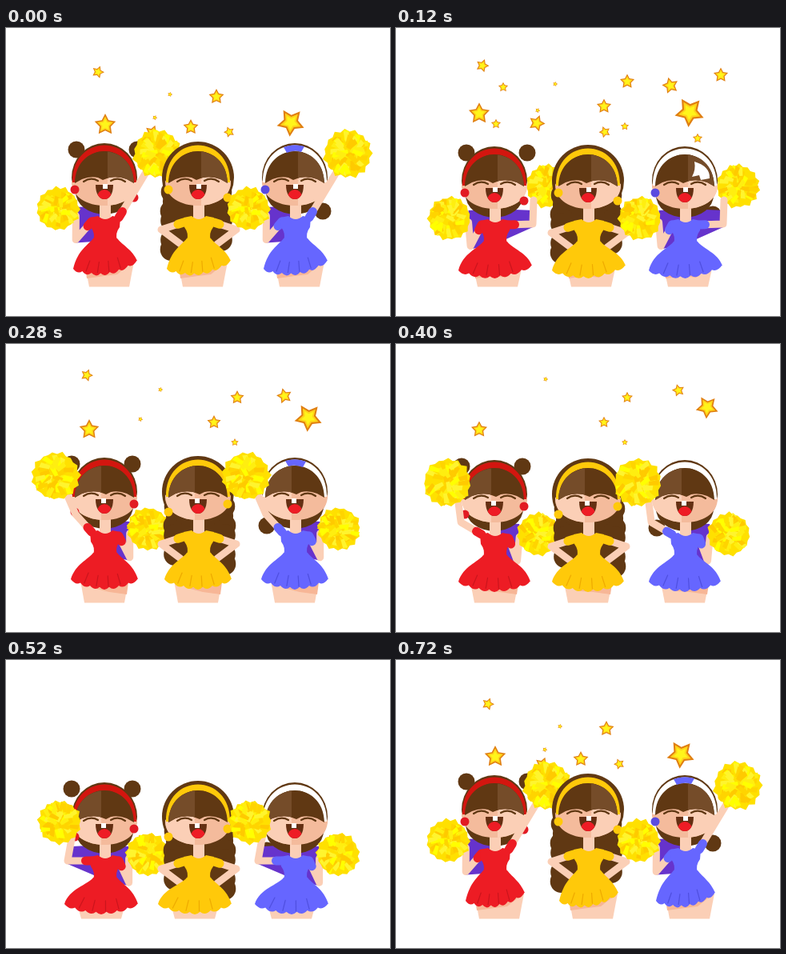
These frames come from a looping animation (480x360 px, 840 ms). An HTML page with a canvas:

```html
<!DOCTYPE html>
<html lang="en">
<head>
<meta charset="utf-8">
<title>Cheerleaders</title>
<style>
html, body { margin: 0; width: 100%; height: 100%; overflow: hidden; background: #fff; }
canvas { display: block; width: 480px; height: 360px; }
</style>
</head>
<body>
<canvas id="stage" width="480" height="360"></canvas>
<script>
const ctx = document.getElementById('stage').getContext('2d');
const HAIR = '#603813', SHINE = '#754c29', SKIN = '#fbcfb6', SHADE = '#f4bb9c', CAPE = '#6633cc';
const TAU = Math.PI * 2, MID = 124;

const girls = [
  { kind: 'buns', dx: 0, main: '#ed1c24', dark: '#cb151d', band: '#d3160f', ear: '#e21b23' },
  { kind: 'long', dx: 117, main: '#ffc90a', dark: '#eeaa00', band: '#ffc90a', ear: '#ffc90a' },
  { kind: 'tail', dx: 238, main: '#6666ff', dark: '#4f4fdf', band: '#ffffff', ear: '#5a4be0' }
];

// y: head height, side: which way she faces, poms: left and right hand.
const cheer = { beat: 0, y: 187, side: 1, lean: 5, flare: 37, poms: [[65, 226], [189, 157]] };
const poses = [
  { at: 0, ...cheer, flare: 40 },
  { at: 40, ...cheer },
  { at: 120, beat: 1, y: 191, side: 1, lean: 3, flare: 46, poms: [[67, 238], [189, 198]], glare: true },
  { at: 280, beat: 2, y: 185, side: -1, lean: -1, flare: 42, poms: [[62, 165], [178, 231]] },
  { at: 400, beat: 3, y: 188, side: -1, lean: -1, flare: 45, poms: [[64, 173], [178, 238]] },
  { at: 520, beat: 4, y: 196, side: -1, lean: -5, flare: 46, poms: [[67, 203], [177, 243]] },
  { at: 720, ...cheer }
];

// x, y, size, first beat, last beat, drift per beat
const stars = [
  [356, 118, 18, 0, 3, 11, -13], [115, 55, 8, 0, 2, -7, -8], [205, 83, 3, 0, 3, -6, -13],
  [186, 112, 3, 0, 2, -9, -9], [183, 131, 10, 0, 1, -7, -12], [279, 130, 7, 0, 1, -18, 0],
  [124, 121, 14, 0, 0], [263, 86, 10, 0, 0], [231, 124, 10, 0, 0],
  [343, 72, 10, 1, 3, 5, -7], [104, 107, 13, 1, 3], [289, 67, 9, 1, 3], [260, 98, 9, 1, 3],
  [286, 123, 5, 1, 3], [406, 59, 9, 1, 1], [134, 74, 6, 1, 1], [125, 120, 6, 1, 1], [377, 138, 6, 1, 1]
];

function random(seed) {
  let s = seed * 7919 + 17;
  return () => (s = (s * 16807) % 2147483647) / 2147483647;
}

function oval(x, y, rx, ry, color) {
  ctx.fillStyle = color;
  ctx.beginPath();
  ctx.ellipse(x, y, rx, ry, 0, 0, TAU);
  ctx.fill();
}
const dot = (x, y, r, color) => oval(x, y, r, r, color);

function box(x, y, w, h, color) {
  ctx.fillStyle = color;
  ctx.fillRect(x, y, w, h);
}

function poly(points, color) {
  ctx.fillStyle = color;
  ctx.beginPath();
  points.forEach(([x, y]) => ctx.lineTo(x, y));
  ctx.closePath();
  ctx.fill();
}

function shape(d, color) {
  ctx.fillStyle = color;
  ctx.fill(new Path2D(d));
}

function clipped(d, color, paint) {
  shape(d, color);
  ctx.save();
  ctx.clip(new Path2D(d));
  paint();
  ctx.restore();
}

function line(points, width, color) {
  ctx.strokeStyle = color;
  ctx.lineWidth = width;
  ctx.lineCap = ctx.lineJoin = 'round';
  ctx.beginPath();
  points.forEach(([x, y]) => ctx.lineTo(x, y));
  ctx.stroke();
}

function ring(x, y, n, turn, radius) {
  return Array.from({ length: n }, (_, i) => {
    const a = turn + i * TAU / n - TAU / 4, d = radius(i);
    return [x + d * Math.cos(a), y + d * Math.sin(a)];
  });
}

function drawStar([x, y, size, first, last, vx = 0, vy = 0], beat) {
  if (beat < first || beat > last) return;
  const age = beat - first;
  const r = Math.max(3, size * Math.cos((beat - 1) / 3 * TAU / 6));
  const layer = (k, color) => poly(
    ring(x + vx * age, y + vy * age, 10, vx * -0.05, i => r * k * (i % 2 ? 0.52 : 1)), color);
  layer(1.06, '#e07f12');
  layer(0.8, '#ffd41a');
  layer(0.55, '#fff51a');
}

function pom([x, y], r, seed) {
  const rnd = random(seed);
  poly(ring(x, y, 30, rnd() * TAU, i => r * (i % 2 ? 0.92 : 0.95 + rnd() * 0.12)), '#ffe000');
  const tones = ['#ffff00', '#ffca00', '#ffee10', '#ffd400', '#fff42e'];
  for (let i = 0; i < 46; i++) {
    const a = rnd() * TAU, d = r * 0.78 * Math.sqrt(rnd());
    const l = r * 0.22, w = r * 0.11;
    ctx.save();
    ctx.translate(x + d * Math.cos(a), y + d * Math.sin(a));
    ctx.rotate(a + (rnd() - 0.5) * 1.2);
    poly([[-l, -w * 0.6], [l, -w], [l * 0.8, w], [-l, w * 0.8]], tones[i % 5]);
    ctx.restore();
  }
}

// Two equal bones from shoulder to the pom's rim, elbow pointing out and down.
function reach(p, hand) {
  const [px, py] = p.poms[hand], out = hand ? 1 : -1;
  const raised = py < p.y;
  const sx = MID + out * 17, sy = p.y + (raised ? 50 : 55);
  const dist = Math.hypot(px - sx, py - sy);
  const ux = (px - sx) / dist, uy = (py - sy) / dist, d = dist - 24;
  const bend = Math.sqrt(Math.max(0, 30 * 30 - d * d / 4));
  return {
    raised, pom: [px, py], size: raised ? 30 : 27,
    joints: [
      [sx, sy],
      [sx + ux * d / 2 - out * uy * bend, sy + uy * d / 2 + out * ux * bend],
      [sx + ux * d, sy + uy * d]
    ]
  };
}

function drawArm(joints, main) {
  line(joints, 9, SKIN);
  const [[sx, sy], [ex, ey]] = joints;
  line([[sx, sy], [sx + (ex - sx) * 0.25, sy + (ey - sy) * 0.25]], 11, main);
}

function drawCape(arm, bust) {
  if (arm.raised) return;
  const [, elbow, hand] = arm.joints;
  poly([[MID, bust - 14], [hand[0], bust - 12], [elbow[0], elbow[1] + 4], [MID, bust + 30]], CAPE);
}

// Head parts are drawn facing left and mirrored by inHead.
function inHead(p, paint) {
  ctx.save();
  ctx.translate(MID - 1, p.y);
  ctx.scale(-p.side, 1);
  paint();
  ctx.restore();
}

function hairTie(g) {
  if (g.kind === 'buns') [-41, 35].forEach(x => dot(x, -35, 10.5, HAIR));
  if (g.kind === 'tail') dot(-35, 42, 10.5, HAIR);
}

function backHair(g) {
  if (g.kind === 'long') {
    for (let y = 18; y <= 90; y += 12) {
      const swell = 2 * Math.sin(y / 6);
      if (y < 80) dot(-28 - swell, y, 14, HAIR);
      dot(32 + swell, y, 14, HAIR);
    }
    box(-30, 20, 60, 64, HAIR);
    oval(0, 0, 45, 45, HAIR);
  } else {
    oval(0, 0, 41, 43, HAIR);
    oval(0, 18, 36, 28, HAIR);
  }
}

function face(g, p) {
  clipped('M-41 5C-41 25-21 35 0 35C21 35 41 25 41 5C38-6-38-6-41 5Z', SHADE,
    () => box(-45, -10, 41, 60, SKIN));

  shape('M-40 6C-41-56 41-56 40 6L36 6C34-46-34-46-36 6Z', g.band);
  clipped('M-37 7C-36-46 36-46 37 7L28 2Q18-2 8 0L2 3L-6 0Q-18-2-28 2Z', HAIR,
    () => box(-40, -40, 36, 50, SHINE));
  if (g.kind === 'tail') {
    if (p.y < 188) shape('M-12-39Q2-43 14-38L10-31Q0-35-8-32Z', '#6666ff');
    if (p.glare) shape('M-12-24Q-32-18-31-3L-20-1L-18-7L-9-5Q-14-14-12-24Z', '#fff');
  }

  ctx.strokeStyle = HAIR;
  ctx.lineWidth = 2.2;
  ctx.lineCap = 'round';
  ctx.stroke(new Path2D('M-26 5Q-17-1-8 4M8 4Q17-1 26 5'));

  clipped('M-11 9L11 9C11 21 6 27 0 27C-6 27-11 21-11 9Z', '#642f12',
    () => oval(0, 24, 9, 9, '#ee1c25'));
  box(-4, 8, 6, 6, '#fff');

  if (g.kind !== 'tail') dot(-37, 25, 5.5, g.ear);
  if (g.kind !== 'tail' || p.side > 0) dot(37, 15, 5.5, g.ear);
}

function legs(p, top) {
  ctx.save();
  ctx.translate(MID + p.lean, 0);
  ctx.scale(-p.side, 1);
  poly([[-31, top], [31, top], [25, 323.5], [-25, 323.5]], SKIN);
  poly([[-30, top], [31, top], [28, 313], [6, 310], [-10, top + 16]], '#f7b696');
  ctx.restore();
}

function dress(g, p, y) {
  const waist = y + 27, hem = y + 71, x = MID + Math.min(p.lean, 0), tilt = Math.max(p.lean, 0);
  shape(`M105 ${y + 1}L115 ${y - 1}Q124 ${y + 7} 133 ${y - 1}L143 ${y + 1}L142 ${y + 13}` +
        `Q136 ${y + 21} 139 ${waist + 2}L109 ${waist + 2}Q112 ${y + 21} 106 ${y + 13}Z`, g.main);

  const at = u => [x + p.flare * u, hem - 11 * u * u - tilt * u];
  const [lx, ly] = at(-1), [rx, ry] = at(1), folds = 7;
  let d = `M109 ${waist}C102 ${waist + 9} ${lx + 6} ${waist + 14} ${lx} ${ly}`;
  for (let i = 0; i < folds; i++) {
    const [cx, cy] = at((i + 0.5) / folds * 2 - 1), [ex, ey] = at((i + 1) / folds * 2 - 1);
    d += `Q${cx} ${cy + 5} ${ex} ${ey - 1}`;
  }
  shape(d + `L${rx} ${ry}C${rx - 6} ${waist + 14} 146 ${waist + 9} 139 ${waist}Z`, g.main);
  for (let u = -0.6; u < 0.6; u += 0.36) {
    const [fx, fy] = at(u);
    line([[fx, fy - 2], [fx + (MID - fx) * 0.2, fy - 15]], 1.2, g.dark);
  }
}

function girl(g, p) {
  const bust = p.y + 49, hasPoms = g.kind !== 'long';
  const arms = hasPoms ? [reach(p, 0), reach(p, 1)] : [];
  const behind = arm => p.beat === 1 && arm === arms[1];
  const drawPom = arm => pom(arm.pom, arm.size, p.beat * 8 + arms.indexOf(arm) + 3);

  ctx.save();
  ctx.translate(g.dx, 0);
  inHead(p, () => hairTie(g));
  arms.forEach(arm => drawCape(arm, bust));
  arms.filter(behind).forEach(drawPom);
  inHead(p, () => backHair(g));
  legs(p, bust + 56);
  box(117, bust - 16, 14, 20, SKIN);
  inHead(p, () => face(g, p));
  if (hasPoms) arms.forEach(arm => drawArm(arm.joints, g.main));
  else for (const s of [-1, 1]) {
    drawArm([[MID + s * 19, bust + 7], [MID + s * 47, bust + 16], [MID + s * 23, bust + 34]], g.main);
  }
  dress(g, p, bust);
  arms.filter(arm => !behind(arm)).forEach(drawPom);
  ctx.restore();
}

function draw(p) {
  box(0, 0, 480, 360, '#fff');
  stars.forEach(s => drawStar(s, p.beat));
  girls.forEach(g => girl(g, p));
}

const LOOP = 840, start = performance.now();
let shown = null;
function tick() {
  const t = (performance.now() - start) % LOOP;
  const pose = poses.findLast(p => p.at <= t) || poses[0];
  if (pose !== shown) draw(shown = pose);
  requestAnimationFrame(tick);
}
tick();
</script>
</body>
</html>
```
